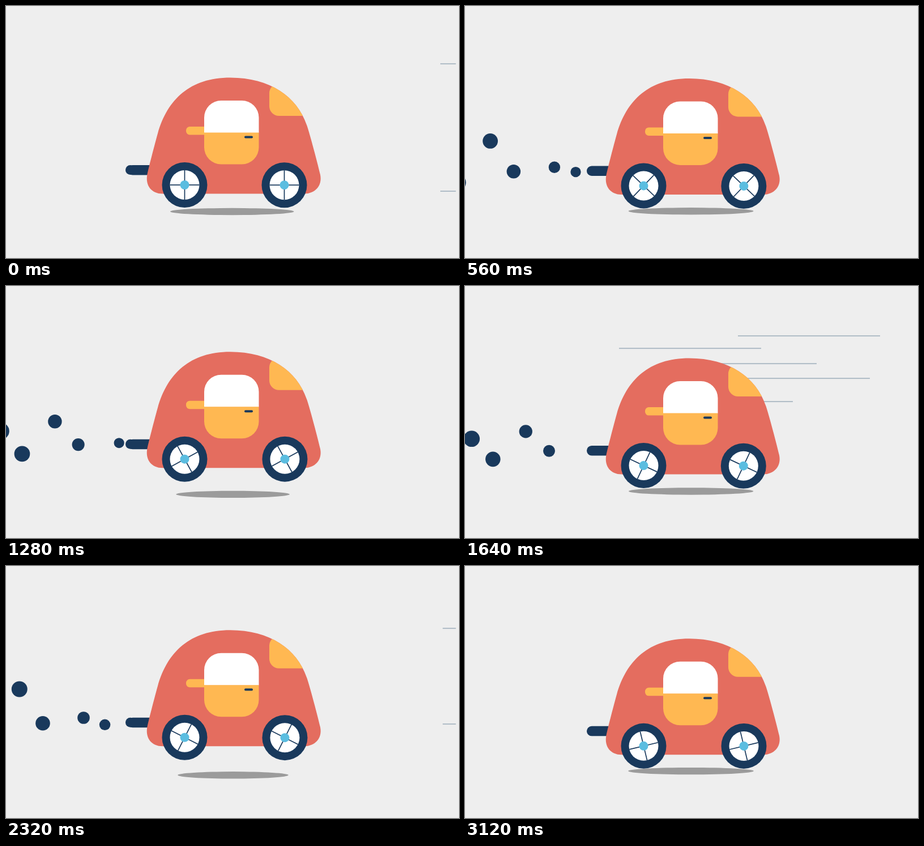
These frames come from a looping animation (800x445 px, 3160 ms). An HTML page with a canvas:

```html
<!DOCTYPE html>
<html>
<head>
<meta charset="utf-8">
<style>
html, body { margin: 0; width: 100%; height: 100%; overflow: hidden; background: #eee; }
canvas { display: block; }
</style>
</head>
<body>
<canvas id="stage" width="800" height="445"></canvas>
<script>
const ctx = document.getElementById('stage').getContext('2d');
const LOOP = 3160, STEP = 40, TAU = Math.PI * 2;
const RED = '#e46d5f', AMBER = '#ffb852', NAVY = '#19395c', BLUE = '#5bbde0';

const body = new Path2D('M276 331.5C258 331.5 245.5 318 249.5 297C253 281 263 243 268 225' +
  'C285 165 325 126.5 396 126.5C466 126.5 514 160 531 210C534 217 549 272 555 298' +
  'C559 318 545 331.5 527 331.5Z');

// Hops: start, end, height
const hops = [[-56, 530, 23], [530, 1110, 23], [1110, 1681, 19],
  [1890, 2507, 23], [2507, 3104, 23], [3104, 3690, 23]];

// Speed lines: offset from the group's left edge, height on the stage
const streaks = [[210, 88], [0, 110], [98, 137], [192, 163], [56, 204], [0, 279]];
// Passes: time, left edge at that time, scale
const passes = [[0, 767, 1.331], [920, 272, 1], [1640, 272, 1], [2480, 272, 1]];

// Exhaust puffs: delay within a cycle, slope of the path
const puffs = [[0, -.1], [72, .09], [183, -.3], [262, .01]];
const cycles = [0, 400, 800, 1200, 1720, 2120];

function lift(t) {
  const hop = hops.find(([a, b]) => t >= a && t < b);
  if (!hop) return 0;
  const [a, b, height] = hop;
  return height * (1 - Math.cos(TAU * (t - a) / (b - a))) / 2;
}

function ellipse(x, y, rx, ry, color) {
  ctx.fillStyle = color;
  ctx.beginPath();
  ctx.ellipse(x, y, rx, ry, 0, 0, TAU);
  ctx.fill();
}

function disc(x, y, r, color) {
  ellipse(x, y, r, r, color);
}

function box(x, y, w, h, r, color) {
  ctx.fillStyle = color;
  ctx.beginPath();
  ctx.roundRect(x, y, w, h, r);
  ctx.fill();
}

function drawStreaks(t) {
  ctx.save();
  ctx.beginPath();
  ctx.rect(0, 0, 794.5, 445);
  ctx.clip();
  ctx.fillStyle = '#afbcc6';
  for (const [start, left, scale] of passes) {
    if (Math.abs(t - start) > 520) continue;
    const x = left - 3.12 * scale * (t - start);
    const top = scale === 1 ? 110 : 102;
    for (const [dx, y] of streaks)
      ctx.fillRect(x + dx * scale, top + (y - 110) * scale - .9, 251 * scale, 2);
  }
  ctx.restore();
}

function drawPuffs(t) {
  for (const start of cycles)
    for (const [delay, slope] of puffs) {
      const age = t - start - delay;
      if (age < 0 || age > 520) continue;
      const d = .522 * Math.max(0, age - 42);
      disc(219.5 - d, 289.5 + slope * d, 8.5 + .028 * d, NAVY);
    }
}

function drawWheel(x, y, angle) {
  disc(x, y, 40, NAVY);
  disc(x, y, 26, '#fff');
  ctx.save();
  ctx.translate(x, y);
  ctx.rotate(angle);
  ctx.fillStyle = NAVY;
  ctx.fillRect(-26, -.85, 52, 1.7);
  ctx.fillRect(-.85, -26, 1.7, 52);
  ctx.restore();
  disc(x, y, 8, BLUE);
}

function drawCar(t) {
  box(215, 281, 60, 17.5, 8.7, NAVY);
  ctx.fillStyle = RED;
  ctx.fill(body);

  ctx.save();
  ctx.clip(body);
  box(465, 137, 100, 57, 17, AMBER);
  ctx.restore();

  box(318, 213, 40, 14.5, 6.5, AMBER);
  box(350, 167, 96.5, 57, [30, 30, 0, 0], '#fff');
  box(350, 223.5, 96.5, 56, [0, 0, 30, 30], AMBER);
  box(421, 229.5, 15, 4, 2, NAVY);

  // The front wheel sits slightly off its axle
  const angle = t * .3995 * Math.PI / 180;
  drawWheel(315.5, 316, angle);
  drawWheel(492 - .5 * Math.cos(angle), 316.2 - .5 * Math.sin(angle), angle);
}

function draw(t) {
  const up = lift(t), k = up / 23;
  ctx.fillStyle = '#eee';
  ctx.fillRect(0, 0, 800, 445);
  drawStreaks(t);
  ellipse(399 + 3 * k, 362 + 11 * k, 111 - 20 * k, 6.2, '#9b9b9b');
  ctx.save();
  ctx.translate(0, 2 - up);
  drawPuffs(t);
  drawCar(t);
  ctx.restore();
}

const began = performance.now();
function tick() {
  const t = (performance.now() - began) % LOOP;
  draw(Math.floor(t / STEP) * STEP);
  requestAnimationFrame(tick);
}
tick();
</script>
</body>
</html>
```
